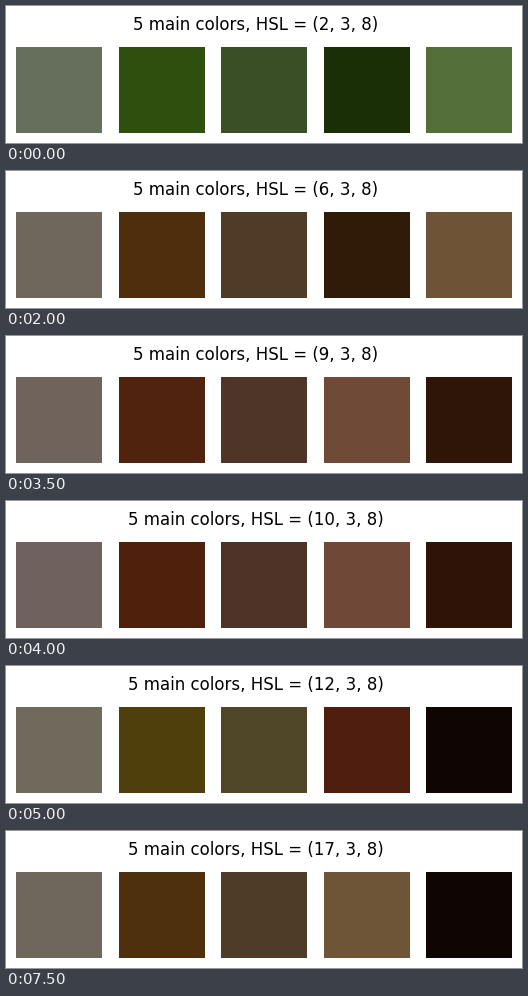
Write a matplotlib script that moves like this. It is 516 px wide and 137 px high and loops after 8000 ms.

```python
import colorsys

import matplotlib.pyplot as plt
from matplotlib.animation import FuncAnimation
from matplotlib.patches import Rectangle

W, H, DPI = 516, 137, 100
S_BINS, V_BINS = 3, 8
FIRST, LAST = 2, 17
SIDE, STEP, LEFT, TOP = 86, 102.62, 10, 41

# (saturation bin, value bin) of each main tone
GRAY, VIVID, MUTED, DEEP, LIGHT, BLACK = (
    (0, 3), (2, 2), (1, 2), (2, 1), (1, 3), (2, 0))


def main_bins(n):
    """Most frequent (hue bin, tone) pairs when hue is cut into n bins."""
    if n <= 8:
        return [(0, t) for t in (GRAY, VIVID, MUTED, DEEP, LIGHT)]
    if n <= 10:
        return [(0, t) for t in (GRAY, VIVID, MUTED, LIGHT, DEEP)]
    if n == 11:
        return [(0, GRAY), (1, VIVID), (0, VIVID), (1, MUTED), (0, BLACK)]
    fourth = (0, VIVID) if n == 12 else (1, LIGHT)
    return [(1, GRAY), (1, VIVID), (1, MUTED), fourth, (0, BLACK)]


def bin_color(n, hue, tone):
    """Colour at the centre of a bin, cut to 8 bits per channel."""
    s, v = tone
    rgb = colorsys.hsv_to_rgb((hue + 0.5) / n, (s + 0.5) / S_BINS,
                              (v + 0.5) / V_BINS)
    return [int(c * 255) / 255 for c in rgb]


fig = plt.figure(figsize=(W / DPI, H / DPI), dpi=DPI, facecolor="white")
ax = fig.add_axes([0, 0, 1, 1])
ax.set(xlim=(0, W), ylim=(H, 0))
ax.axis("off")

title = ax.text(250, 10, "", ha="center", va="top", fontsize=12,
                family="DejaVu Sans", color="black")
squares = [
    ax.add_patch(Rectangle((round(LEFT + STEP * k), TOP), SIDE, SIDE,
                           linewidth=0, antialiased=False))
    for k in range(5)
]


def update(i):
    n = FIRST + i
    title.set_text(f"5 main colors, HSL = ({n}, {S_BINS}, {V_BINS})")
    for square, (hue, tone) in zip(squares, main_bins(n)):
        square.set_facecolor(bin_color(n, hue, tone))
    return [title, *squares]


anim = FuncAnimation(fig, update, frames=LAST - FIRST + 1, interval=500,
                     init_func=lambda: update(0), repeat=True, repeat_delay=0)
plt.show()
```
